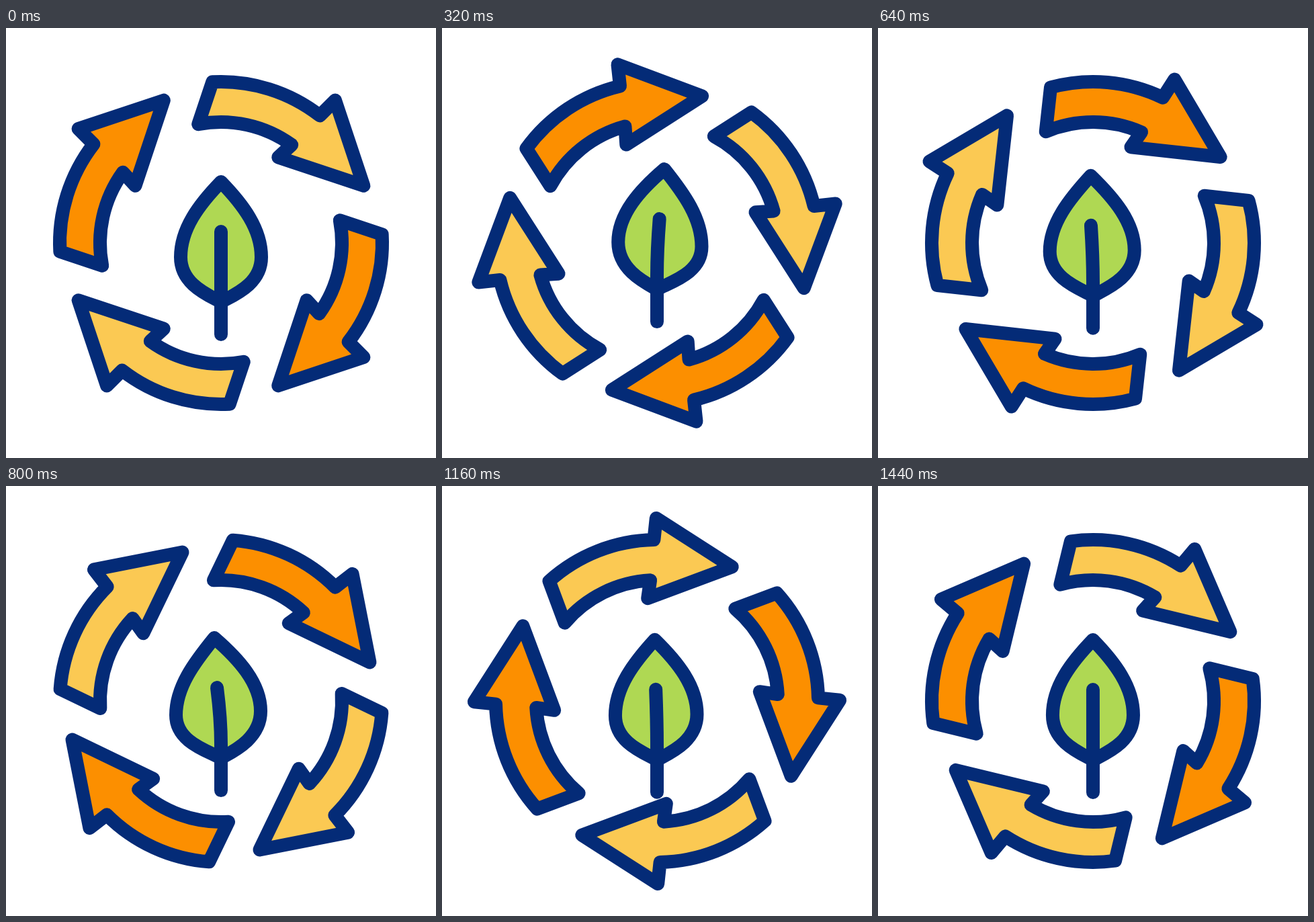
An HTML page with a canvas for the animation above (1480 ms loop, 640 by 640 pixels).

```html
<!DOCTYPE html>
<html lang="en">
<head>
<meta charset="utf-8">
<title>Recycling leaf</title>
<style>
  html, body { margin: 0; width: 100%; height: 100%; overflow: hidden; background: #fff; }
  canvas { display: block; width: 640px; height: 640px; }
</style>
</head>
<body>
<canvas id="stage" width="640" height="640"></canvas>
<script>
const ctx = document.getElementById('stage').getContext('2d');
const LOOP = 1480, STEP = 40, THIRD = LOOP / 3;
const NAVY = '#042b77', YELLOW = '#fbc953', ORANGE = '#fc8f00', GREEN = '#afd853';
const START_ANGLE = 18.45 * Math.PI / 180;

// Leaf poses: rise of the whole leaf, sideways lean of tip and vein, extra half width.
const REST = { rise: 0, tip: 0, vein: 0, wide: 0 };
const RIGHT = { rise: 26.7, tip: 15.4, vein: 5.2, wide: 3 };
const LEFT = { rise: 0.8, tip: -12.2, vein: -7, wide: 3 };

const easeInOut = u => Math.sin(u * Math.PI / 2) ** 2.15;
const easeOut = u => (1 - Math.exp(-3.6 * u)) / (1 - Math.exp(-3.6));

function mix(a, b, p) {
  const pose = {};
  for (const key in a) pose[key] = a[key] + (b[key] - a[key]) * p;
  return pose;
}

function leafPose(t) {
  if (t < THIRD) return mix(REST, RIGHT, easeInOut(t / THIRD));
  if (t < 2 * THIRD) return mix(RIGHT, LEFT, easeOut(t / THIRD - 1));
  return mix(LEFT, REST, easeOut(t / THIRD - 2));
}

function drawArrow(angle, color) {
  const outer = 240, inner = 180;
  ctx.save();
  ctx.translate(320, 320);
  ctx.rotate(angle);
  ctx.beginPath();
  ctx.arc(0, 0, outer, Math.atan2(-223.3, -88), Math.atan2(-226.4, 79.6));
  ctx.lineTo(94, -255.3);
  ctx.lineTo(174.5, -148);
  ctx.lineTo(40.5, -148);
  ctx.arc(0, 0, inner, Math.atan2(-172, 53.6), Math.atan2(-157, -88), true);
  ctx.closePath();
  ctx.fillStyle = color;
  ctx.fill();
  ctx.stroke();
  ctx.restore();
}

function drawLeaf({ rise, tip, vein, wide }) {
  const tipX = 320 + tip, tilt = tip * 0.5 * Math.PI / 180;
  const cos = Math.cos(tilt), sin = Math.sin(tilt);
  const shoulder = side => [
    tipX + side * 33 * cos - 34 * sin,
    229 + side * 33 * sin + 34 * cos
  ];
  const flank = side => [320 + side * (60 + wide) + tip * 0.4, 341 + side * tip * 0.3];
  const [lx, ly] = flank(-1), [rx, ry] = flank(1);

  ctx.save();
  ctx.translate(0, -rise);
  ctx.beginPath();
  ctx.moveTo(tipX, 229);
  ctx.bezierCurveTo(...shoulder(-1), lx, ly - 42, lx, ly);
  ctx.bezierCurveTo(lx, ly + 40, 300, 397, 320, 408);
  ctx.bezierCurveTo(340, 397, rx, ry + 40, rx, ry);
  ctx.bezierCurveTo(rx, ry - 42, ...shoulder(1), tipX, 229);
  ctx.closePath();
  ctx.fillStyle = GREEN;
  ctx.fill();
  ctx.stroke();

  ctx.beginPath();
  ctx.moveTo(320, 456);
  ctx.lineTo(320, 388);
  ctx.quadraticCurveTo(320, 350, 320 + vein, 303);
  ctx.stroke();
  ctx.restore();
}

function draw(now) {
  const t = Math.floor(((now + 0.5) % LOOP) / STEP) * STEP;
  ctx.fillStyle = '#fff';
  ctx.fillRect(0, 0, 640, 640);
  ctx.strokeStyle = NAVY;
  ctx.lineWidth = 20;
  ctx.lineCap = ctx.lineJoin = 'round';
  const turn = START_ANGLE + Math.PI * t / LOOP;
  for (let i = 0; i < 4; i++) drawArrow(turn + i * Math.PI / 2, i % 2 ? ORANGE : YELLOW);
  drawLeaf(leafPose(t));
}

function tick(now) {
  draw(now);
  requestAnimationFrame(tick);
}

draw(0);
requestAnimationFrame(tick);
</script>
</body>
</html>
```
